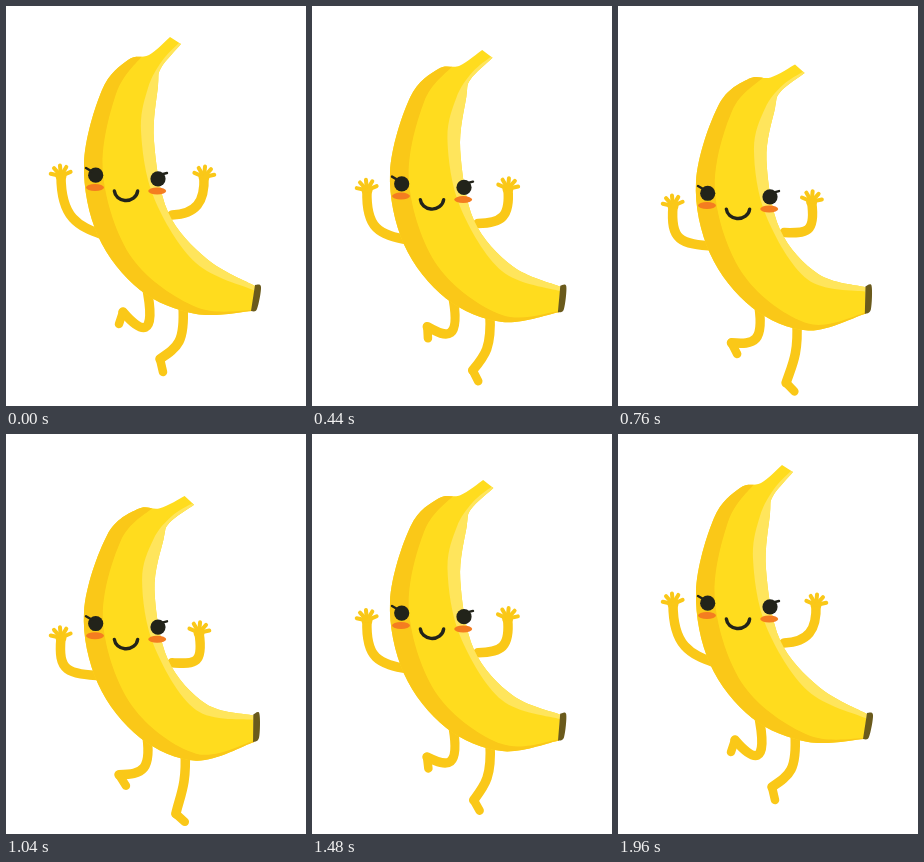
These frames come from a looping animation (300 px wide and 400 px high, 2000 ms). An HTML page with a canvas:

```html
<!DOCTYPE html>
<html lang="en">
<head>
<meta charset="utf-8">
<title>Dancing banana</title>
<style>
html, body { margin: 0; width: 100%; height: 100%; overflow: hidden; background: #fff; }
canvas { display: block; }
</style>
</head>
<body>
<canvas id="stage" width="300" height="400"></canvas>
<script>
const ctx = document.getElementById('stage').getContext('2d');
const STEP = 40, LOOP = 2000, LAST = 49;
const GOLD = '#fac818', YELLOW = '#ffdc1e', PALE = '#ffe55c', INK = '#22231a', BLUSH = '#f47d20';
let k = 0; // 0 = stretched, 1 = crouched

// Body outlines and shading edges of the stretched pose; bend() gives every other pose.
const outer = [[164,31], [143,49], [122,54], [96,84], [78,158], [92,230], [134,284], [190,308], [246,305]];
const inner = [[249,280], [201,253], [162,206], [148,135], [152,80], [155,62], [175,38]];
const shade = [[136,50], [110,88], [97,168], [126,252], [190,301], [248,304]];
const glow = [[173,37], [156,55], [142,82], [135,125], [148,192], [190,257], [250,285]];
const tip = [[249,279], [255,281], [251,303], [245,305]];

// Limbs, stretched and crouched: a Bezier, and for legs the toe.
const arms = [
  [[[55,170], [55,212], [72,220], [97,229]], [[55,204], [52,238], [60,240], [98,242]]],
  [[[198,171], [199,196], [190,208], [166,209]], [[193,199], [198,232], [188,230], [166,229]]]
];
const legs = [
  [[[140,278], [152,336], [134,326], [117,306], [113,318]], [[140,296], [147,338], [136,340], [113,341], [120,352]]],
  [[[177,300], [179,336], [172,341], [154,353], [157,366]], [[179,318], [181,350], [174,362], [170,380], [179,388]]]
];

// Stem leans right and down, belly sinks, tip stays put and turns upright.
function bend([x, y]) {
  const up = Math.max(0, 160 - y) / 130;
  const out = (Math.max(0, x - 170) / 78) ** 2 * (y > 160);
  const dx = 15 * up ** 2 + 0.15 * (y - 290) * out;
  const dy = 20 + 0.23 * (x - 115) * up - 18 * out;
  return [x + k * dx, y + k * dy];
}

// Smooth curve through all points, appended to the current path.
function curve(p, join) {
  const at = i => p[Math.max(0, Math.min(p.length - 1, i))];
  const handle = (i, dir) => at(i).map((v, c) => v + dir * (at(i + 1)[c] - at(i - 1)[c]) / 6);
  ctx[join ? 'lineTo' : 'moveTo'](...p[0]);
  for (let i = 0; i < p.length - 1; i++) {
    ctx.bezierCurveTo(...handle(i, 1), ...handle(i + 1, -1), ...p[i + 1]);
  }
}

function stroke(width, color) {
  ctx.lineWidth = width;
  ctx.strokeStyle = color;
  ctx.stroke();
}

function line(from, to, width, color) {
  ctx.beginPath();
  ctx.moveTo(...from);
  ctx.lineTo(...to);
  stroke(width, color);
}

function oval(x, y, rx, ry, color) {
  ctx.beginPath();
  ctx.ellipse(x, y, rx, ry, 0, 0, 7);
  ctx.fillStyle = color;
  ctx.fill();
}

function region(points, corners, color) {
  ctx.beginPath();
  curve(points.map(bend));
  corners.forEach(c => ctx.lineTo(...c));
  ctx.fillStyle = color;
  ctx.fill();
}

function limb([a, b]) {
  const [start, c1, c2, end, toe] = a.map((p, i) => p.map((v, c) => v + (b[i][c] - v) * k));
  ctx.beginPath();
  ctx.moveTo(...start);
  ctx.bezierCurveTo(...c1, ...c2, ...end);
  stroke(9.5, GOLD);
  if (toe) line(end, toe, 8.5, GOLD);
  return start;
}

function hand([x, y], tilt) {
  oval(x, y, 5.5, 5.5, GOLD);
  for (let i = -2; i <= 2; i++) {
    const a = i * 0.63 + tilt;
    line([x, y], [x + 10.5 * Math.sin(a), y - 10.5 * Math.cos(a)], 4, GOLD);
  }
}

function body() {
  ctx.save();
  ctx.beginPath();
  curve(outer.map(bend));
  curve(inner.map(bend), true);
  ctx.closePath();
  ctx.fillStyle = YELLOW;
  ctx.fill();
  ctx.clip();
  region(shade, [[300, 400], [0, 400], [0, 0]], GOLD);
  region(glow, [[300, 285], [300, 0]], PALE);
  ctx.restore();
  region(tip, [], '#6a5a1c');
}

function face() {
  ctx.save();
  ctx.translate(0, 20.5 * k);
  oval(89, 181.5, 9, 3.5, BLUSH);
  oval(151.2, 185, 9, 3.5, BLUSH);
  oval(89.7, 169.2, 7.6, 7.6, INK);
  oval(152, 172.8, 7.6, 7.6, INK);
  line([80, 162], [86, 165.5], 2.4, INK);
  line([155, 168.5], [161, 167], 2.4, INK);
  ctx.beginPath();
  ctx.ellipse(120, 184, 11.7, 10.5, 0, 0.1, Math.PI - 0.1);
  stroke(3.4, INK);
  ctx.restore();
}

function draw() {
  const step = Math.floor(performance.now() % LOOP / STEP);
  k = (1 - Math.cos(2 * Math.PI * step / LAST)) / 2;
  ctx.clearRect(0, 0, 300, 400);
  ctx.lineCap = ctx.lineJoin = 'round';
  arms.forEach((arm, i) => hand(limb(arm), i ? 0.1 : -0.1));
  legs.forEach(limb);
  body();
  face();
  requestAnimationFrame(draw);
}
draw();
</script>
</body>
</html>
```
